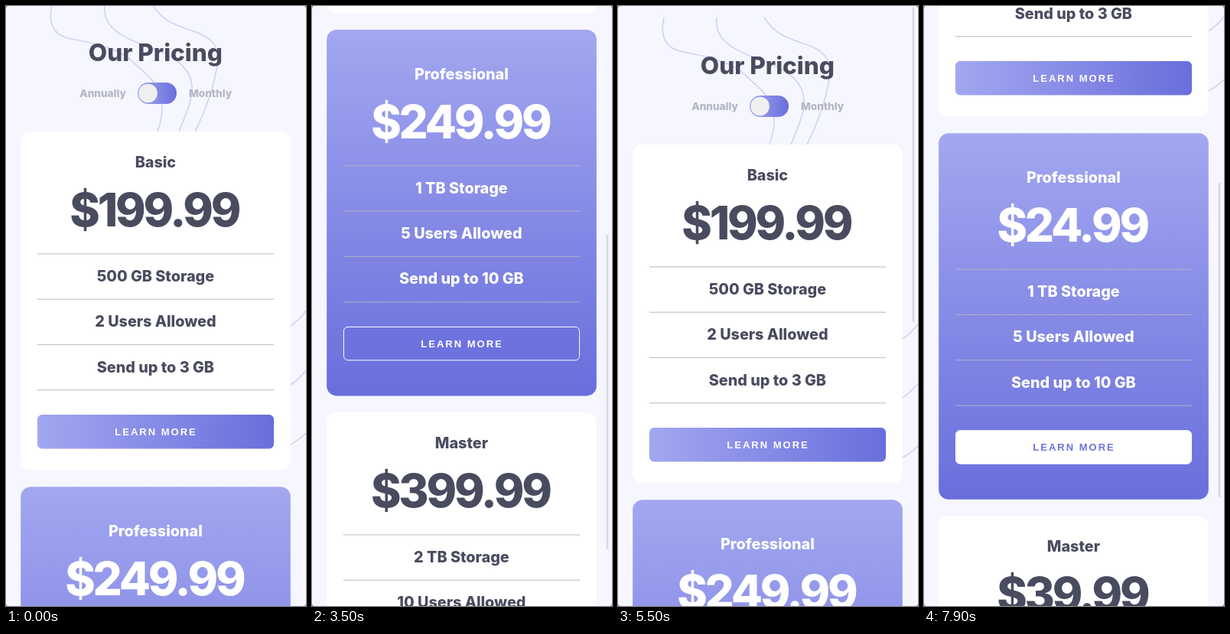
An HTML page that plays this animation: 392 by 784 pixels, repeating every 8000 ms.

```html
<!DOCTYPE html>
<html lang="en">
<head>
<meta charset="utf-8">
<title>Pricing</title>
<style>
  html, body { margin: 0; width: 100%; height: 100%; overflow: hidden; background: #f6f6fe; }
  svg { display: block; width: 100vw; height: 100vh; }
  text { font-family: Inter, "Open Sans", sans-serif; font-weight: 800; fill: #494b5f; text-anchor: middle; }
  .heading { font-size: 31.5px; }
  .item { font-size: 19.8px; }
  .price { font-size: 60px; letter-spacing: -3.2px; }
  .label { font-size: 13.6px; fill: #b4b5c6; }
  .action { font: 700 13px "Liberation Sans", Arial, sans-serif; letter-spacing: 2px; }
  .wave { fill: none; stroke: #d3d4f4; stroke-width: 1.7; }
  .rule { fill: #b4b5c6; opacity: .8; }
  .featured text { fill: #fff; }
  .button rect { fill: url(#across); stroke: url(#across); }
  .button text { fill: #fff; }
  .featured .button rect { fill: #fff; stroke: #fff; }
  .featured .button text { fill: #6d72de; }
  .button.hover rect { fill: #fff; stroke: #6d72de; }
  .button.hover text { fill: #6d72de; }
  .featured .button.hover rect { fill: #6d72de; stroke: #fff; }
  .featured .button.hover text { fill: #fff; }
</style>
</head>
<body>
<svg viewBox="0 0 392 784">
  <defs>
    <linearGradient id="across"><stop stop-color="#a2a7f0"/><stop offset="1" stop-color="#696edc"/></linearGradient>
    <linearGradient id="down" x2="0" y2="1"><stop stop-color="#a2a7f0"/><stop offset="1" stop-color="#696edc"/></linearGradient>
  </defs>
  <g id="page">
    <path class="wave" d="M60-2C54 26 64 39 85 43C118 49 150 56 168 75C190 95 216 112 198 164"/>
    <path class="wave" d="M129-2C126 24 144 38 180 51C222 65 243 82 243 108C243 126 234 144 226 164"/>
    <path class="wave" d="M191-2C206 22 225 26 248 34C272 43 279 54 276 78C271 110 261 136 247 164"/>
    <path class="wave" d="M392 398Q383 411 370 419M392 476Q383 488 370 496M392 558Q383 567 370 574"/>
    <text class="heading" x="195.4" y="71.5">Our Pricing</text>
    <text class="label" x="126.5" y="119">Annually</text>
    <text class="label" x="267" y="119">Monthly</text>
    <rect x="172" y="100" width="51" height="28" rx="14" fill="url(#across)"/>
    <circle id="knob" cy="114" r="12.3" fill="#f0f0f0"/>
  </g>
  <rect id="bar" x="384.6" width="2.6" height="411" rx="1.3" fill="#d8d8e0"/>
  <path d="M0 0h3Q0 0 0 3zM392 0v3Q392 0 389 0zM0 784v-3Q0 784 3 784zM392 784h-3Q392 784 392 781z" fill="#55555c"/>
</svg>
<script>
const LOOP = 8000, STEP = 100;
const MID = 195.4, PITCH = 482.2, ROW = 59.3, OVERHANG = 18;
const page = document.getElementById('page');
const knob = document.getElementById('knob');
const bar = document.getElementById('bar');

// A yearly price is the monthly number followed by another 9
const plans = [
  { name: 'Basic', rate: 19, storage: '500 GB', users: 2, send: 3 },
  { name: 'Professional', rate: 24, storage: '1 TB', users: 5, send: 10, featured: true },
  { name: 'Master', rate: 39, storage: '2 TB', users: 10, send: 20 }
];
const glides = [
  { start: 1900, length: 750, to: 535 },
  { start: 3380, length: 390, to: 811 },
  { start: 5200, length: 300, to: -17 },
  { start: 5500, length: 250, to: 0 },
  { start: 7100, length: 800, to: 462 }
];
const toggle = { start: 6400, length: 650 };
const hover = { start: 1500, each: 1600, end: 5500 };

const clamp = x => Math.min(1, Math.max(0, x));
const smooth = x => x * x * (3 - 2 * x);
const progress = (span, t) => smooth(clamp((t - span.start) / span.length));

function add(parent, tag, attrs, text) {
  const node = document.createElementNS('http://www.w3.org/2000/svg', tag);
  for (const key in attrs) node.setAttribute(key, attrs[key]);
  if (text) node.textContent = text;
  return parent.appendChild(node);
}

function buildCard(plan, index) {
  const extra = plan.featured ? OVERHANG : 0;
  const card = add(page, 'g', {
    class: plan.featured ? 'featured' : 'plain',
    transform: `translate(0 ${index * PITCH})`
  });
  add(card, 'rect', { x: 19.2, y: 164 - extra, width: 352.6, height: 442.5 + 2 * extra, rx: 13,
    fill: plan.featured ? 'url(#down)' : '#fff' });
  add(card, 'text', { class: 'item', x: MID, y: 211 }, plan.name);
  plan.price = add(card, 'text', { class: 'price', x: MID - 1.6, y: 288 });
  for (let i = 0; i < 4; i++) {
    add(card, 'rect', { class: 'rule', x: 41, y: 323.3 + i * ROW, width: 309, height: 1.2 });
  }
  [`${plan.storage} Storage`, `${plan.users} Users Allowed`, `Send up to ${plan.send} GB`].forEach((item, i) =>
    add(card, 'text', { class: 'item', x: MID, y: 360 + i * ROW }, item));
  plan.button = add(card, 'g', { class: 'button' });
  add(plan.button, 'rect', { x: 41.5, y: 534.5, width: 308, height: 43.5, rx: 5.5 });
  add(plan.button, 'text', { class: 'action', x: 196, y: 561 }, 'LEARN MORE');
}

function scrollAt(t) {
  return glides.reduce((pos, glide) => pos + (glide.to - pos) * progress(glide, t), 0);
}

// The scrollbar lingers after each glide, then fades
function barAlpha(t) {
  const last = glides.filter(glide => glide.start < t).pop();
  return last ? clamp((last.start + last.length + 450 - t) / 150) : 0;
}

function draw(t) {
  const scroll = scrollAt(t);
  page.setAttribute('transform', `translate(0 ${-scroll})`);
  bar.setAttribute('y', Math.max(2, scroll / 2));
  bar.setAttribute('opacity', barAlpha(t));
  knob.setAttribute('cx', 185.6 + 24 * progress(toggle, t));
  const hovered = t < hover.end ? Math.floor((t - hover.start) / hover.each) : -1;
  plans.forEach((plan, index) => {
    plan.button.classList.toggle('hover', index === hovered);
    plan.price.textContent = `$${plan.rate}${t < toggle.start ? 9 : ''}.99`;
  });
}

plans.forEach(buildCard);
const start = performance.now();
function tick() {
  const t = (performance.now() - start) % LOOP;
  draw(Math.floor(t / STEP) * STEP);
  requestAnimationFrame(tick);
}
tick();
</script>
</body>
</html>
```
